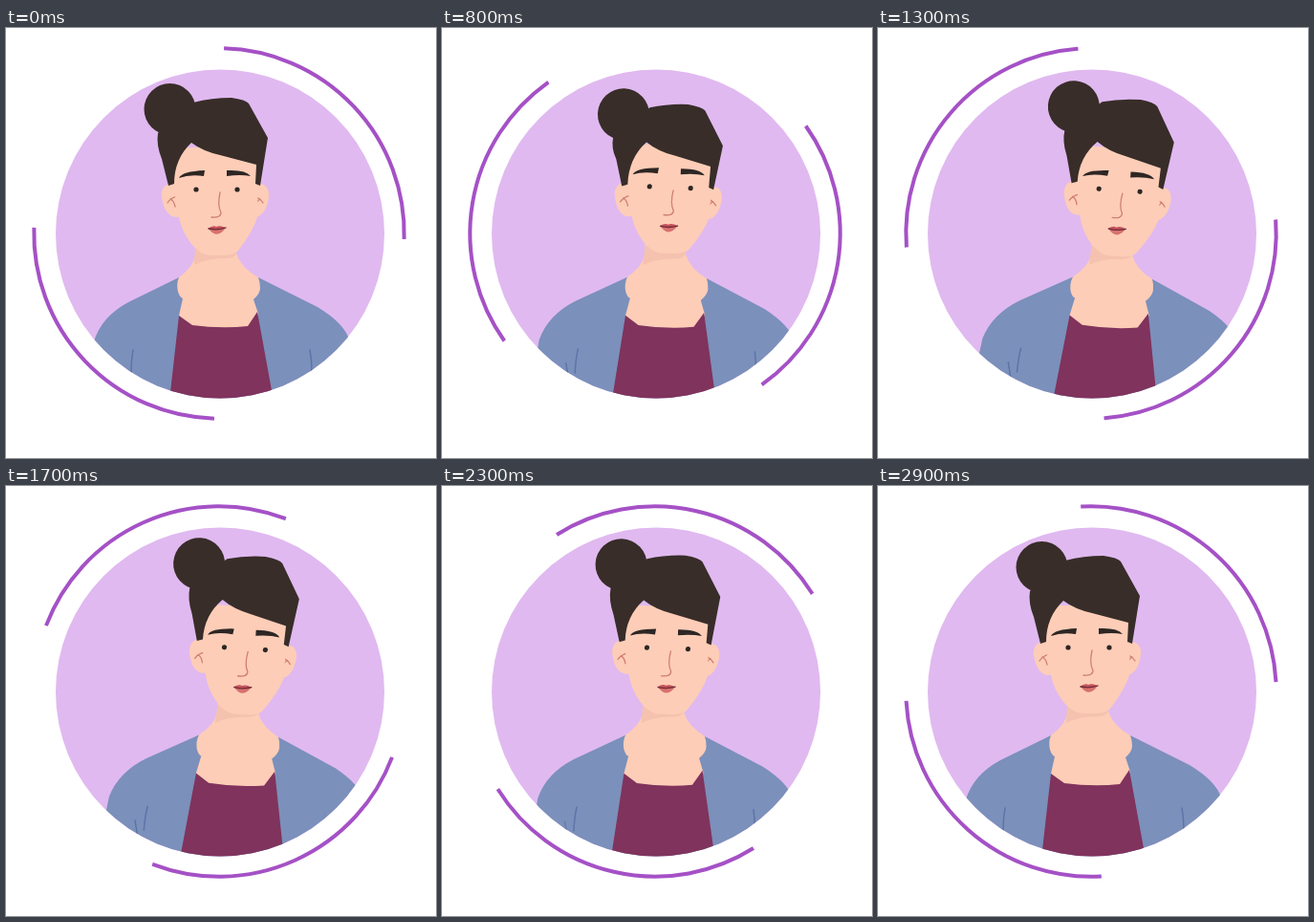
Animation of 450x450 px, one loop 3000 ms. Source, as an HTML page:

```html
<!DOCTYPE html>
<html lang="en">
<head>
<meta charset="utf-8">
<title>Portrait</title>
<style>
  html, body { margin: 0; width: 100%; height: 100%; overflow: hidden; background: #fff; }
  svg { display: block; width: 100%; height: 100%; }
  .skin { fill: #fdcdb7; }
  .dark { fill: #382d29; }
  .jacket { fill: #7b90bb; }
  .line { fill: none; stroke-linecap: round; stroke-linejoin: round; }
  .fold { stroke: #5c75a6; stroke-width: 1.5; }
  .feature { stroke: #d07f72; stroke-width: 1.3; }
</style>
</head>
<body>
<svg viewBox="0 0 450 450">
  <defs>
    <clipPath id="disc"><circle cx="224" cy="215.5" r="172"/></clipPath>
    <g id="ear">
      <path class="skin" d="M178 165C167 159 160 169 164 182C166 192 173 201 183 197Z"/>
      <path class="line feature" d="M169 183Q172 178 179 176M172 179Q176 181 177 187"/>
    </g>
  </defs>
  <circle cx="224" cy="215.5" r="172" fill="#e0b9f0"/>
  <circle id="ring" cx="223" cy="215" r="193.7" fill="none" stroke="#a551c6" stroke-width="4"
    pathLength="360" stroke-dasharray="90.3 89.7"/>
  <g clip-path="url(#disc)">
    <g id="body">
      <path class="jacket" d="M181 261L128 287Q100 302 92 328L80 420H375L359 326Q354 309 326 292L264 261Z"/>
      <path class="skin" d="M198 225V238Q196 250 181 261Q178 268 180 276Q182 282 185 283L181 301L190 320H256L264 299L259 284Q266 278 266 272Q266 266 264 261Q246 251 241 236V225Z"/>
      <path fill="#f4c2ae" d="M198 228H241V235Q240 241 230 241Q210 241 197 248Z"/>
      <path fill="#80335c" d="M181 301L195 311Q225 315 253 312L263 297L280 390H171Z"/>
      <path class="line fold" d="M133 337Q131 348 131 362"/>
      <path id="rightFold" class="line fold" d="M318 337Q320 348 320 362"/>
      <path id="leftFold" class="line fold" d="M121 352L125 369"/>
    </g>
    <g id="head">
      <circle id="bun" class="dark" cx="171.5" cy="85" r="27"/>
      <g id="ears">
        <use href="#ear"/>
        <use href="#ear" transform="matrix(-1 0 0 1 438 0)"/>
      </g>
      <g id="face">
        <path class="skin" d="M176 125H264L263 198Q259 212 243 233Q239 238 226 238H214Q204 238 194 226Q184 213 181 198L175 165Z"/>
        <path fill="#2d2624" d="M181 157Q184 150 208 149L207 155Q192 153 181 157ZM231 149Q251 148 256 155Q245 153 231 155Z"/>
        <circle fill="#2d2624" cx="199" cy="169" r="2.6"/>
        <circle fill="#2d2624" cx="242" cy="169" r="2.6"/>
        <path class="line feature" d="M224 172Q221 186 225 193Q225 199 215 198"/>
        <path fill="#d8726f" d="M212 210Q221 222 230 209Z"/>
        <path fill="#c4525b" d="M211 210Q217 206 220 208Q224 206 230 209Q221 212 211 210Z"/>
        <path class="line" stroke="#6d2a35" stroke-width="1.3" d="M212 210Q221 212 230 209"/>
      </g>
      <path id="hair" class="dark"/>
    </g>
  </g>
</svg>
<script>
const LOOP = 3000, STEP = 100;
const times = [0, 0.4, 0.8, 1.3, 2.1, 2.5, 2.9];
const leanKeys = [0, 7, 18, 32, 22, 8, 0];
const nodKeys = [0, 1, 0.53, 0, -0.1, -0.1, 0];
const ringKeys = [0, 26.4, 53, 84.2, 134.2, 157.6, 175.3];
const $ = id => document.getElementById(id);
const place = (id, transform) => $(id).setAttribute("transform", transform);

// Smooth periodic curve through the keys; gain is added on every loop.
function curve(keys, t, gain = 0) {
  const n = keys.length;
  const key = i => {
    const loops = Math.floor(i / n), k = i - loops * n;
    return [times[k] + loops * 3, keys[k] + loops * gain];
  };
  const slope = i => {
    const [t0, v0] = key(i - 1), [t1, v1] = key(i + 1);
    return (v1 - v0) / (t1 - t0);
  };
  let i = n - 1;
  while (times[i] > t) i--;
  const [t0, v0] = key(i), [t1, v1] = key(i + 1);
  const d = t1 - t0, u = (t - t0) / d, w = 1 - u;
  return v0 * w * w * (1 + 2 * u) + v1 * u * u * (3 - 2 * u)
    + d * u * w * (slope(i) * w - slope(i + 1) * u);
}

// The crown sinks with the nod while the fringe stays in place.
function hairPath(nod) {
  const crown = 11 * nod, tips = 4 * nod;
  return `M159 ${110 + crown}Q157 ${122 + crown} 163 ${137 + tips}L170 ${165 + tips}L176 ${163 + tips}`
    + `Q176 137 194 120Q206 129 224 133L262 143L261 ${163 + tips}L266 ${165 + tips}`
    + `L274 ${115 + crown}L254 ${79 + crown}Q251 ${75 + crown} 236 ${73 + crown}`
    + `Q215 ${73 + crown} 196 ${78 + crown}Z`;
}

function draw(t) {
  const lean = curve(leanKeys, t), nod = curve(nodKeys, t);
  place("ring", `rotate(${curve(ringKeys, t, 180) - 88.5} 223 215)`);
  const tilt = 0.0009 * lean;
  place("body", `matrix(1 ${tilt} ${-0.0026 * lean} 1 ${1.394 * lean} ${-200 * tilt})`);
  place("head", `translate(${0.85 * lean} ${0.02 * lean}) rotate(${0.125 * lean} 221 240)`);
  place("bun", `translate(${-0.15 * lean} ${13 * nod})`);
  place("ears", `translate(0 ${nod})`);
  place("face", `translate(0 ${-5 * nod})`);
  $("hair").setAttribute("d", hairPath(nod));
  $("leftFold").style.opacity = Math.min(1, Math.max(0, (lean - 10) / 8));
  $("rightFold").style.opacity = Math.min(1, Math.max(0, (30 - lean) / 10));
}

function tick() {
  const now = performance.now() % LOOP;
  draw(Math.floor(now / STEP) * STEP / 1000);
  requestAnimationFrame(tick);
}
tick();
</script>
</body>
</html>
```
